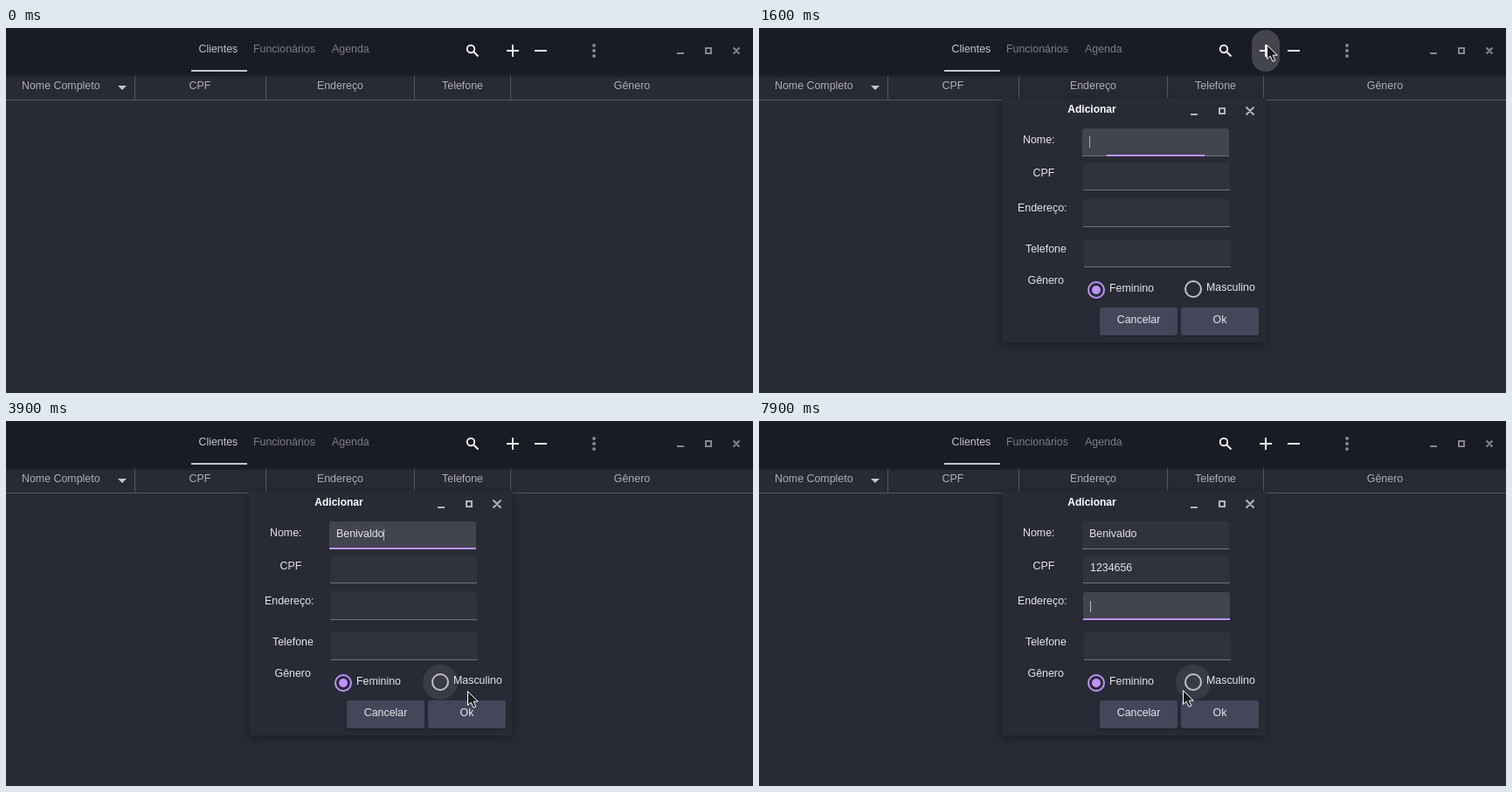
Write an HTML page that moves like this. It is 855 by 418 pixels and loops after 8 s.

```html
<!DOCTYPE html>
<html lang="pt-BR">
<head>
<meta charset="utf-8">
<title>Cadastro de clientes</title>
<style>
  html, body { margin: 0; width: 100%; height: 100%; overflow: hidden; background: #282a36; }
  svg { display: block; }
  text { font: 12.4px "Liberation Sans", Arial, sans-serif; fill: #e6e6ea; white-space: pre; }
  .mid { text-anchor: middle; }
  .tab { fill: #7d7e87; }
  .on { fill: #c6c7cb; }
  .head text { fill: #aeafb5; }
  .title { font-size: 12px; font-weight: bold; fill: #fff; }
  .line { fill: none; stroke-width: 2; }
  .panel { fill: #282a36; filter: drop-shadow(0 3px 6px rgba(0, 0, 0, .35)); }
  .button { fill: #44475a; filter: drop-shadow(0 1px 1px rgba(0, 0, 0, .25)); }
</style>
</head>
<body>
<svg width="855" height="418" viewBox="0 0 855 418">
  <defs>
    <linearGradient id="shade" x2="0" y2="1">
      <stop stop-color="#000" stop-opacity=".28"/>
      <stop offset="1" stop-color="#000" stop-opacity="0"/>
    </linearGradient>
  </defs>
  <rect width="855" height="418" fill="#282a36"/>

  <g class="head">
    <path d="M147.5 54V82M297.5 54V82M467.5 54V82M577.5 54V82M0 82.5H855" stroke="#555761"/>
    <text x="18" y="70">Nome Completo</text>
    <text class="mid" x="222" y="70">CPF</text>
    <text class="mid" x="382.5" y="70">Endereço</text>
    <text class="mid" x="522.5" y="70">Telefone</text>
    <text class="mid" x="716.5" y="70">Gênero</text>
    <path d="M128 66H138L133 71Z" fill="#c6c7cb"/>
  </g>

  <rect width="855" height="54" fill="#191b25"/>
  <rect y="54" width="855" height="4" fill="url(#shade)"/>
  <text class="tab on" x="220.5" y="28">Clientes</text>
  <text class="tab" x="283" y="28">Funcionários</text>
  <text class="tab" x="373" y="28">Agenda</text>
  <rect x="212" y="48" width="64" height="2" fill="#c6c7cb"/>
  <rect id="hover" x="564" y="2" width="32" height="48" rx="16" fill="#fff"/>
  <g class="line" stroke="#ececef">
    <circle cx="532" cy="24" r="4.2"/>
    <path d="M535 27L540.5 32.5M573 26H587M580 19V33M605 26H619"/>
  </g>
  <g fill="#85868e">
    <circle cx="673" cy="20" r="2"/>
    <circle cx="673" cy="26" r="2"/>
    <circle cx="673" cy="32" r="2"/>
  </g>
  <path class="line" stroke="#85868e" d="M768 29H776M801 23H807V29H801ZM832.5 22.5L839.5 29.5M839.5 22.5L832.5 29.5"/>

  <g id="dialog">
    <rect class="panel" x="278" y="80" width="302" height="280" rx="2"/>
    <text class="title mid" x="381" y="97">Adicionar</text>
    <path class="line" stroke="#b4b5bb" d="M494 99H502M527 92H533V98H527ZM557.5 90.5L566.5 99.5M566.5 90.5L557.5 99.5"/>
    <text x="302" y="132">Nome:</text>
    <text x="313.5" y="170">CPF</text>
    <text x="296" y="210">Endereço:</text>
    <text x="305" y="257">Telefone</text>
    <text x="307.5" y="293">Gênero</text>
    <g id="fields"></g>
    <circle id="halo" cx="497" cy="299" r="20" fill="#fff"/>
    <circle class="line" cx="386" cy="300" r="9" stroke="#bd93f9"/>
    <circle cx="386" cy="300" r="5" fill="#bd93f9"/>
    <circle class="line" cx="497" cy="299" r="9" stroke="#c0c1c6"/>
    <text x="401" y="302">Feminino</text>
    <text x="512" y="301">Masculino</text>
    <rect class="button" x="390" y="320" width="89" height="32" rx="3"/>
    <rect class="button" x="483" y="320" width="89" height="32" rx="3"/>
    <text class="mid" x="434.5" y="338">Cancelar</text>
    <text class="mid" x="527.5" y="338">Ok</text>
  </g>

  <path id="pointer" d="M.5 .5V16.5L4.2 13.2L7 19.3L9.8 18.1L7.2 12.2H12.2Z"
        fill="#1b1c22" stroke="#fff" stroke-linejoin="round"/>
</svg>
<script>
const LOOP = 8000, STEP = 100, OPEN = 1600;
const $ = id => document.getElementById(id);

// Each track row is [time, value, ...], joined by straight lines.
const pointer = [
  [200, 573, 372], [300, 560, 290], [400, 545, 190], [500, 537, 110], [600, 542, 58],
  [700, 556, 24], [800, 556, 24], [1100, 586, 22], [1200, 589, 22], [1500, 581, 19],
  [1700, 581, 19], [1900, 574, 70], [2100, 556, 195], [2300, 538, 285], [2500, 528, 309],
  [7500, 528, 309], [7600, 522, 309], [7800, 494, 308], [7900, 485, 308]
];
const hover = [[800, 0], [1100, .08], [1400, .08], [1500, .18], [1700, .18], [2000, 0]];
const halo = [[2200, 0], [2500, .08]];

// keys: [time, letters typed]; caret: [from, to, colour]
const PURPLE = '#bd93f9', PALE = '#b9bac2';
const fields = [
  { x: 370, y: 115, base: 133, text: 'Benivaldo', focus: [1600, 4900],
    grow: [[1600, .67], [1700, .93], [1800, 1]],
    keys: [[2800, 1], [3100, 2], [3200, 3], [3400, 4], [3500, 5], [3600, 7], [3800, 8], [3900, 9]],
    caret: [[1600, 2400, PURPLE], [2800, 4900, PALE]] },
  { x: 371, y: 154, base: 172, text: '1234656', focus: [4900, 6900], grow: [[4900, 1]],
    keys: [[5800, 1], [5900, 2], [6100, 3], [6300, 4], [6500, 5], [6600, 7]],
    caret: [[4900, 6900, PURPLE]] },
  { x: 371, y: 196, base: 215, text: '', focus: [6900, LOOP],
    grow: [[6900, .67], [7000, .93], [7100, 1]], keys: [],
    caret: [[6900, 7100, PURPLE], [7600, LOOP, PALE]] },
  { x: 372, y: 242, base: 261, text: '', focus: [LOOP, LOOP], grow: [[0, 0]], keys: [], caret: [] }
];

function at(track, t) {
  const i = track.findIndex(row => row[0] > t);
  if (i === 0) return track[0].slice(1);
  if (i < 0) return track[track.length - 1].slice(1);
  const a = track[i - 1], b = track[i], k = (t - a[0]) / (b[0] - a[0]);
  return a.slice(1).map((v, n) => v + (b[n + 1] - v) * k);
}

const within = (t, [from, to]) => t >= from && t < to;
const show = (node, on) => node.setAttribute('visibility', on ? 'inherit' : 'hidden');

function add(tag, attrs) {
  const node = document.createElementNS('http://www.w3.org/2000/svg', tag);
  for (const key in attrs) node.setAttribute(key, attrs[key]);
  return $('fields').appendChild(node);
}

for (const f of fields) {
  const { x, y } = f;
  f.box = add('path', { d: `M${x} ${y + 32}v-29q0 -3 3 -3h162q3 0 3 3v29z` });
  add('rect', { x, y: y + 31, width: 168, height: 1, fill: '#70717a' });
  f.bar = add('rect', { y: y + 30, height: 2, fill: PURPLE });
  f.label = add('text', { x: x + 8, y: f.base });
  f.cursor = add('rect', { y: y === 115 || y === 154 ? f.base - 9 : f.base - 9, width: 1, height: 13 });
}

function drawField(f, t) {
  const focused = within(t, f.focus);
  f.box.setAttribute('fill', focused ? '#42444f' : '#30323e');

  const width = focused ? 168 * at(f.grow, t)[0] : 0;
  f.bar.setAttribute('x', f.x + 84 - width / 2);
  f.bar.setAttribute('width', width);

  const typed = f.keys.reduce((n, [time, count]) => t >= time ? count : n, 0);
  f.label.textContent = f.text.slice(0, typed);

  const caret = f.caret.find(span => within(t, span));
  show(f.cursor, caret);
  if (caret) {
    const end = typed ? f.label.getComputedTextLength() : 0;
    f.cursor.setAttribute('x', Math.round(f.x + 8 + end));
    f.cursor.setAttribute('fill', caret[2]);
  }
}

function draw(now) {
  const t = Math.floor(now % LOOP / STEP) * STEP;
  const [x, y] = at(pointer, t).map(Math.round);
  show($('pointer'), t >= 200);
  $('pointer').setAttribute('transform', `translate(${x} ${y})`);
  $('hover').setAttribute('opacity', at(hover, t)[0]);
  $('halo').setAttribute('opacity', at(halo, t)[0]);
  show($('dialog'), t >= OPEN);
  if (t >= OPEN) fields.forEach(f => drawField(f, t));
  else fields.forEach(f => show(f.cursor, false));
  requestAnimationFrame(draw);
}
draw(performance.now());
</script>
</body>
</html>
```
